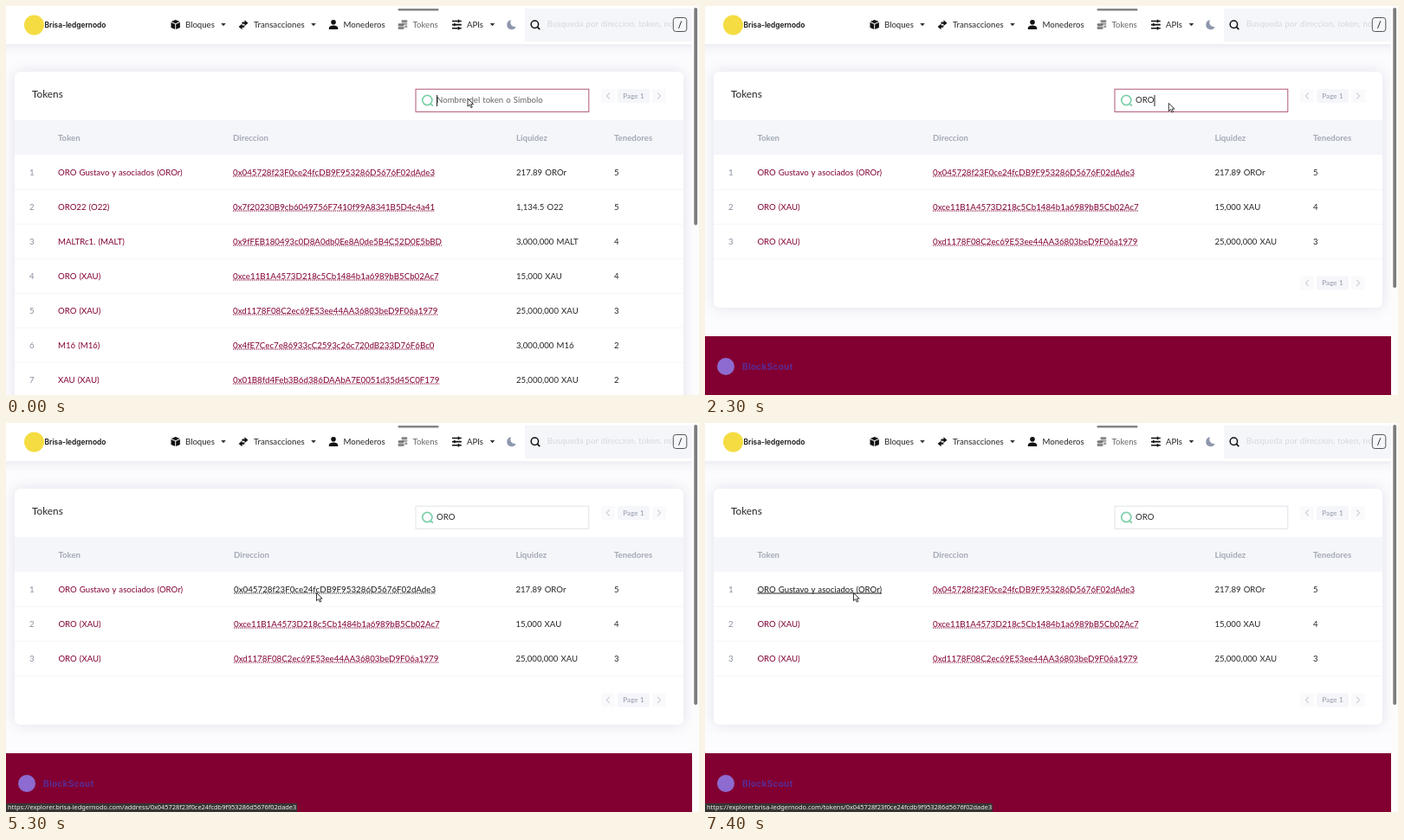
Recreate the animation shown at these times as an HTML page. Size 800 by 450 pixels, loop 8 s.

```html
<!DOCTYPE html>
<html lang="es">
<head>
<meta charset="utf-8">
<title>Tokens</title>
<style>
html, body { margin: 0; width: 100%; height: 100%; overflow: hidden; background: #fcfbfd; }
svg { display: block; width: 100vw; height: 100vh; }
text { font: 9.65px Lato, sans-serif; word-spacing: .6px; fill: #262626; white-space: pre; }
.head { font-weight: 700; fill: #a3a9b5; }
.num { fill: #868d9c; }
.link { fill: #820034; }
.rule { stroke: #820034; }
.addr .link { font-size: 9.75px; }
.hot .link { fill: #1a1a1a; }
.hot .rule { stroke: #1a1a1a; }
.title { font-size: 11.8px; }
.page { font-size: 8px; font-weight: 700; fill: #a9aebb; text-anchor: middle; }
.brand { font: 600 8.4px Inter, sans-serif; fill: #111; }
.foot { font: 700 10px Inter, sans-serif; letter-spacing: .3px; fill: #5a2b93; }
.url { font: 7.38px "Noto Sans", sans-serif; word-spacing: 0; fill: #f2f2f2; }
</style>
</head>
<body>
<svg id="stage" viewBox="0 0 800 450" xmlns="http://www.w3.org/2000/svg"></svg>
<script>
const stage = document.getElementById('stage');
const LOOP = 8000;

const tokens = [
  ['ORO Gustavo y asociados (OROr)', '0x045728f23F0ce24fcDB9F953286D5676F02dAde3', '217.89 OROr', 5],
  ['ORO22 (O22)', '0x7f20230B9cb6049756F7410f99A8341B5D4c4a41', '1,134.5 O22', 5],
  ['MALTRc1. (MALT)', '0x9fFEB180493c0D8A0db0Ee8A0de5B4C52D0E5bBD', '3,000,000 MALT', 4],
  ['ORO (XAU)', '0xce11B1A4573D218c5Cb1484b1a6989bB5Cb02Ac7', '15,000 XAU', 4],
  ['ORO (XAU)', '0xd1178F08C2ec69E53ee44AA36803beD9F06a1979', '25,000,000 XAU', 3],
  ['M16 (M16)', '0x4fE7Cec7e86933cC2593c26c720dB233D76F6Bc0', '3,000,000 M16', 2],
  ['XAU (XAU)', '0x01B8fd4Feb3B6d386DAAbA7E0051d35d45C0F179', '25,000,000 XAU', 2]
];
const found = tokens.filter(t => t[0].startsWith('ORO '));
const hash = tokens[0][1].toLowerCase();
const site = 'https://explorer.brisa-ledgernodo.com/';

// Each state holds until the next one begins.
const states = [
  { at: 0, list: 'all', focus: true, query: '', caret: 497.5, mouse: [533, 107] },
  { at: 500, list: 'found', focus: true, query: 'ORO', caret: 519, mouse: [535.3, 112.5] },
  { at: 3500, list: 'found', query: 'ORO', mouse: [358.5, 196.5], hot: 'addr', url: site + 'address/' + hash, urlW: 336 },
  { at: 6500, list: 'found', query: 'ORO', mouse: [171.5, 196.5], hot: 'name', url: site + 'tokens/' + hash, urlW: 332 }
];

const text = (x, y, s, cls = '', more = '') => `<text x="${x}" y="${y}" class="${cls}" ${more}>${s}</text>`;
const rect = (x, y, w, h, fill, more = '') => `<rect x="${x}" y="${y}" width="${w}" height="${h}" fill="${fill}" ${more}/>`;
const path = (d, more) => `<path d="${d}" ${more}/>`;
const caret = x => path(`M${x} 20h5.6l-2.8 3.2z`, 'fill="#333"');

function pager(y) {
  const chevron = 'fill="none" stroke="#cfd2da" stroke-width="1.1"';
  return rect(687, y, 16, 16, '#fafafc', 'rx="2"') + rect(746, y, 16, 16, '#fafafc', 'rx="2"') +
    rect(706, y, 37, 16, '#f5f6fa', 'rx="2"') + text(724.5, y + 10.8, 'Page 1', 'page') +
    path(`M696.8 ${y + 4.5}l-3.5 3.5 3.5 3.5M752.2 ${y + 4.5}l3.5 3.5-3.5 3.5`, chevron);
}

function table(id, list, x, height) {
  const cols = [['Token', x[0]], ['Direccion', x[1]], ['Liquidez', x[2]], ['Tenedores', 702]];
  const rows = list.map(([name, addr, amount, holders], i) => {
    const y = 195.5 + i * 40;
    const key = i ? '' : id;
    return text(27, y, i + 1, 'num') +
      `<g id="${key && key + '-name'}">${text(x[0], y, name, 'link')}</g>` +
      `<g id="${key && key + '-addr'}" class="addr">${text(x[1], y, addr, 'link')}</g>` +
      text(x[2], y, amount) + text(702, y, holders) +
      rect(10, y + 16.3, 772, 1, '#f6f6fa');
  }).join('');
  return `<g id="${id}">` +
    rect(10, 76, 772, height, '#fff', 'rx="7" filter="url(#soft)"') +
    rect(10, 132, 772, 40, '#f5f6fa') +
    cols.map(([s, cx]) => text(cx, 155.5, s, 'head')).join('') + rows + '</g>';
}

function header() {
  const dark = 'fill="#111"';
  const line = 'fill="none" stroke="#111" stroke-width="1.6"';
  return rect(-20, 0, 832, 44, '#fff', 'filter="url(#soft)"') +
    '<circle cx="32.5" cy="22" r="11.5" fill="#f4dc42"/>' +
    text(44.5, 25, 'Brisa-ledgernodo', 'brand') +
    path('M195.7 16l4.9 2-4.9 2.2-4.9-2.2zM190.5 19l4.7 2.1v6l-4.7-2.2zM200.9 19l-4.7 2.1v6l4.7-2.2z', dark) +
    text(207, 25, 'Bloques') + caret(248.2) +
    path('M272.5 18.6h3v-2.3l4 3.4-4 3.4v-2.4h-3zM275.3 22.6h-2.7v-2.2l-4 3.5 4 3.4v-2.5h2.7z', dark) +
    text(286, 25, 'Transacciones') + caret(352.2) +
    `<circle cx="378" cy="18.8" r="2.8" ${dark}/>` +
    path('M372.8 27v-1.4c0-4 10.4-4 10.4 0v1.4z', dark) +
    text(389.5, 25, 'Monederos') +
    rect(452.5, 3, 47, 2.5, '#858585', 'rx="1"') +
    rect(456.4, 16.2, 7, 2.8, '#888', 'rx="1.2"') + rect(456.4, 19.6, 7, 2.2, '#999', 'rx="1"') +
    rect(452.6, 20.2, 7, 2.8, '#777', 'rx="1.2"') + rect(452.6, 23.6, 7, 3.4, '#888', 'rx="1.2"') +
    rect(460.1, 22.4, 3.3, 2.6, '#999', 'rx="1"') +
    text(469.5, 25, 'Tokens', '', 'style="fill:#666"') +
    path('M515 17.5h10.8M515 21.6h10.8M515 25.7h10.8', line) +
    path('M522.5 15.8v3.4M517.8 19.9v3.4M522.5 24v3.4', line) +
    text(532, 25, 'APIs') + caret(558.7) +
    path('M583.2 16.3a5.4 5.4 0 1 0 5.4 7.6a5 5 0 0 1-5.4-7.6z', 'fill="#8e97ad"') +
    rect(599, 3, 193, 38, '#f5f6fa') +
    '<circle cx="610.4" cy="21.2" r="4.2" fill="none" stroke="#111" stroke-width="1.5"/>' +
    path('M613.3 24.1l3 3', line) +
    `<g clip-path="url(#field)">${text(624.8, 24.3, 'Busqueda por direccion, token, nombre', '', 'style="fill:#d6d8e0"')}</g>` +
    rect(770.3, 13.5, 15.5, 16, '#f5f6fa', 'rx="3" stroke="#555" stroke-width="1"') +
    path('M779.8 17.3l-3.3 8.6', 'stroke="#333" stroke-width="1"');
}

stage.innerHTML =
  `<defs>
    <filter id="soft" x="-10%" y="-60%" width="120%" height="240%">
      <feDropShadow dx="0" dy="0" stdDeviation="8" flood-color="#352a60" flood-opacity=".1"/>
    </filter>
    <clipPath id="field"><rect x="600" y="5" width="169.5" height="34"/></clipPath>
  </defs>` +
  rect(0, 0, 800, 450, '#fcfbfd') +
  header() +
  table('all', tokens, [60, 262, 589], 420) +
  table('found', found, [60.4, 263, 588.4], 273) +
  text(30, 106, 'Tokens', 'title') +
  pager(96) +
  `<g id="below">${pager(312.5)}${rect(0, 382, 792, 68, '#820031')}
    <circle cx="24" cy="417" r="10" fill="#8d6bd0"/>${text(43, 421.2, 'BlockScout', 'foot')}</g>` +
  rect(473, 96.2, 199.8, 26.2, '#fff', 'id="box"') +
  '<circle cx="486.3" cy="109" r="5.6" fill="none" stroke="#7dcfa8" stroke-width="1.7"/>' +
  path('M490 112.8l2.8 2.8', 'stroke="#7dcfa8" stroke-width="1.8"') +
  text(497, 112.4, '', '', 'id="query"') +
  rect(0, 103, 1, 13, '#222', 'id="caret"') +
  rect(792, 0, 8, 450, '#fcfcfc') +
  rect(794.3, 2, 3.8, 250, '#7c7c7c', 'id="thumb" rx="1.8"') +
  `<g id="status">${rect(0, 440, 336, 10, '#353432', 'id="plate"')}${text(2, 447.3, '', 'url', 'id="url"')}</g>` +
  path('M0 0v9.2l2.2-2 1.6 3.4 1.5-.7-1.6-3.3h3z', 'id="mouse" fill="#fff" stroke="#222" stroke-width=".9"');

const $ = id => document.getElementById(id);
const show = (id, on) => $(id).setAttribute('visibility', on ? 'visible' : 'hidden');

function underline(group, dash) {
  const label = group.querySelector('text');
  const x = +label.getAttribute('x');
  const y = +label.getAttribute('y') + 1.5;
  group.insertAdjacentHTML('beforeend',
    `<path class="rule" d="M${x} ${y}h${label.getComputedTextLength()}" stroke-width="1" stroke-dasharray="${dash}"/>`);
}
document.querySelectorAll('.addr').forEach(g => underline(g, '1.4 1'));
underline($('found-name'), 'none');

let current;
function render(ms) {
  const s = states.filter(k => k.at <= ms).pop();
  if (s === current) return;
  current = s;
  const filtered = s.list === 'found';
  show('all', !filtered);
  show('found', filtered);
  show('below', filtered);
  $('thumb').setAttribute('height', filtered ? 324 : 251.5);
  $('box').setAttribute('stroke', s.focus ? '#b05878' : '#e0e3e9');
  $('query').textContent = s.query || 'Nombre del token o Simbolo';
  $('query').style.fill = s.query ? '#262626' : '#666';
  show('caret', s.caret);
  $('caret').setAttribute('x', (s.caret || 0) - .5);
  $('found-addr').classList.toggle('hot', s.hot === 'addr');
  $('found-name').classList.toggle('hot', s.hot === 'name');
  $('found-name').querySelector('.rule').style.display = s.hot === 'name' ? '' : 'none';
  show('status', s.url);
  $('plate').setAttribute('width', s.urlW || 0);
  $('url').textContent = s.url || '';
  $('mouse').setAttribute('transform', `translate(${s.mouse})`);
}

const start = performance.now();
function tick() {
  render((performance.now() - start) % LOOP);
  requestAnimationFrame(tick);
}
tick();
</script>
</body>
</html>
```
